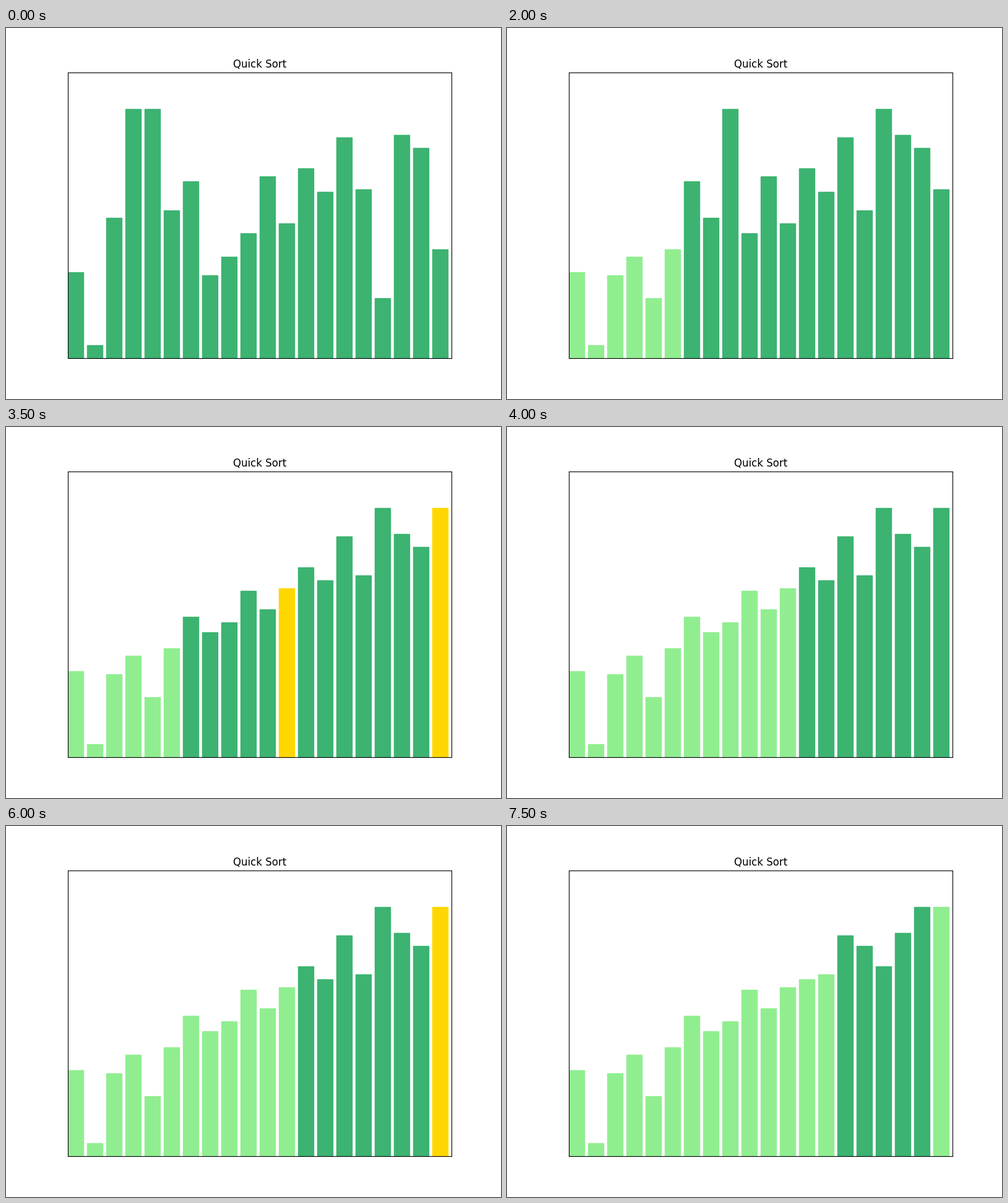
Recreate the animation shown at these times as a matplotlib script. Size 800 by 600 pixels, loop 8 s.

```python
from itertools import islice

import matplotlib.pyplot as plt
from matplotlib.animation import FuncAnimation

VALUES = [33, 5, 54, 96, 96, 57, 68, 32, 39, 48,
          70, 52, 73, 64, 85, 65, 23, 86, 81, 42]
PIVOTS = [19, 15, 19, 15, 16]
ACTIVE, IDLE, SWAPPED = "mediumseagreen", "lightgreen", "gold"
FRAMES = 16


def quick_sort(a, pivots):
    """Yield (values, lo, hi, swapped) per step, right part first."""
    stack = [(0, len(a) - 1)]

    def swap(i, j):
        a[i], a[j] = a[j], a[i]

    while stack:
        lo, hi = stack.pop()
        if lo >= hi:
            continue
        swap(next(pivots, hi), hi)
        yield a[:], lo, hi, ()  # pivot moved to the end
        yield a[:], lo, hi, ()  # range highlighted
        store = lo
        for j in range(lo, hi + 1):
            if a[j] <= a[hi]:
                swap(store, j)
                yield a[:], lo, hi, (store, j)
                store += 1
        mid = store - 1
        stack += [(lo, mid - 1), (mid + 1, hi)]


# Every second step is shown.
states = list(islice(quick_sort(VALUES[:], iter(PIVOTS)), 1, 2 * FRAMES, 2))

fig, ax = plt.subplots(figsize=(8, 6), dpi=100)
bars = ax.bar(range(len(VALUES)), VALUES, align="edge")
ax.set(xlim=(0, len(VALUES)), ylim=(0, 110), xticks=[], yticks=[])
ax.set_title("Quick Sort")


def update(frame):
    values, lo, hi, swapped = states[frame]
    for i, (bar, value) in enumerate(zip(bars, values)):
        bar.set_height(value)
        if i in swapped:
            bar.set_color(SWAPPED)
        else:
            bar.set_color(ACTIVE if lo <= i <= hi else IDLE)
    return bars


anim = FuncAnimation(fig, update, frames=FRAMES, interval=500, repeat=True,
                     repeat_delay=0, blit=False)
plt.show()
```
